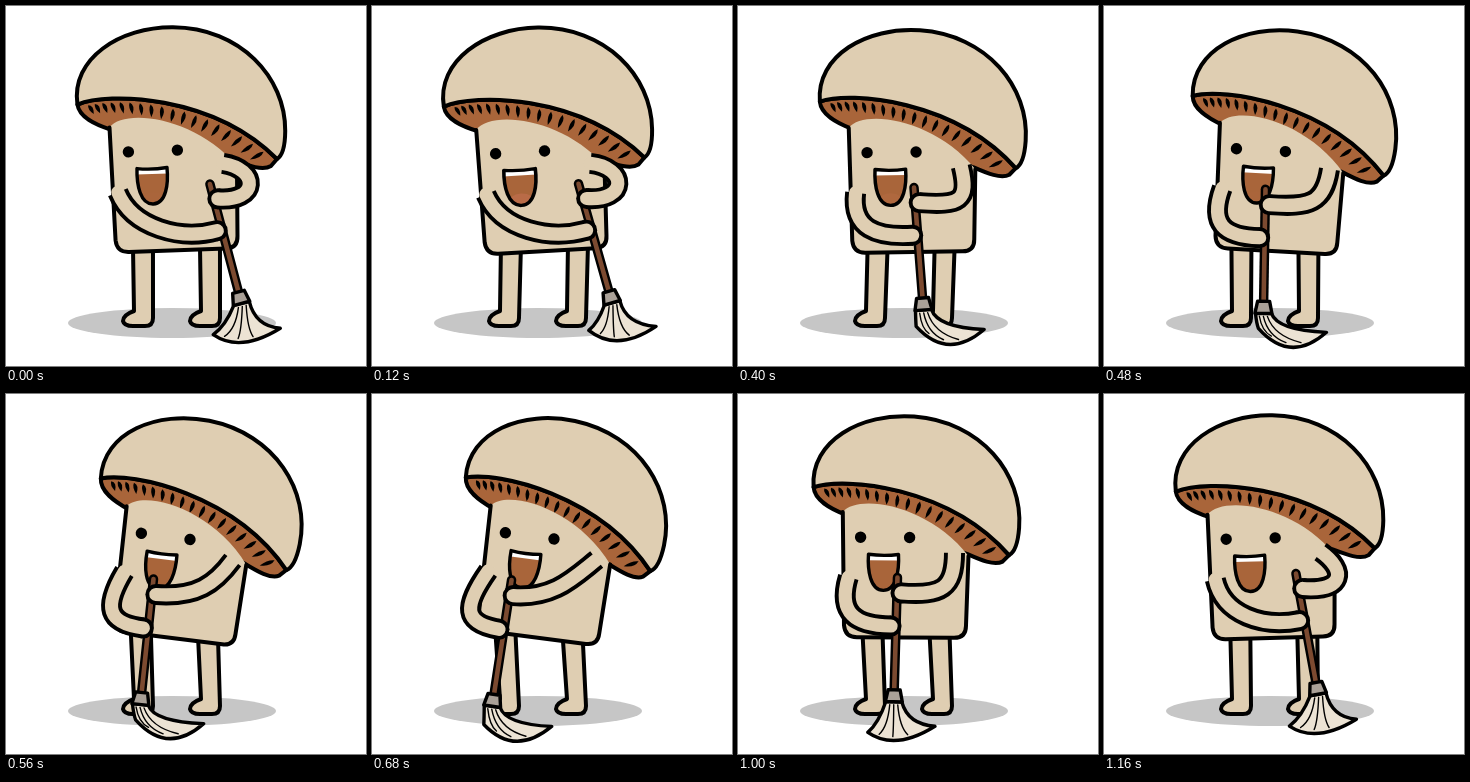
Animation, 360 px wide and 360 px high, one loop 1.2 s. Source, as an HTML page:

```html
<!DOCTYPE html>
<html lang="en">
<head>
<meta charset="utf-8">
<title>Mopping mushroom</title>
<style>
  html, body { margin: 0; width: 100%; height: 100%; overflow: hidden; background: #fff; }
  svg { display: block; width: 100%; height: 100%; }
  .ink { fill: none; stroke: #000; stroke-width: 4; stroke-linecap: round; stroke-linejoin: round; }
  .thin { stroke-width: 3.4; }
  .skin { fill: #dfceb2; }
  .brown { fill: #a9653a; }
</style>
</head>
<body>
<svg viewBox="0 0 360 360">
  <ellipse cx="166" cy="317" rx="104" ry="15" fill="#c6c6c6"/>
  <path id="legL" class="ink skin"/>
  <path id="legR" class="ink skin"/>
  <g id="cap">
    <path class="ink brown" d="M70 97C72 110 88 117 104 122L228 152C242 157 256 162 264 157L270 150C205 86 100 84 70 97Z"/>
    <g id="gills"></g>
    <path class="ink skin" d="M70 97C63 51 112 19 165 19C232 19 278 68 278 122C278 138 275 147 270 150C205 86 100 84 70 97Z"/>
  </g>
  <g id="body">
    <path class="skin" d="M-63 -125L-61 -12Q-60 0 -48 0H49Q61 0 61 -12L63 -82C23 -133 -48 -144 -63 -125Z"/>
    <path class="ink" d="M-63 -125L-61 -12Q-60 0 -48 0H49Q61 0 61 -12L63 -82"/>
    <circle cx="-45" cy="-100" r="5.7"/>
    <circle cx="4" cy="-100" r="5.7"/>
    <clipPath id="lips"><path d="M-15 0Q0 2 15 0C16 16 13 36 0 36C-13 36 -16 16 -15 0Z"/></clipPath>
    <g id="mouth">
      <g clip-path="url(#lips)">
        <rect class="brown" x="-20" y="-2" width="40" height="40"/>
        <ellipse id="tongue" cy="34" rx="13" ry="10" fill="#dc7866"/>
        <rect x="-20" y="-2" width="40" height="8" fill="#fff"/>
      </g>
      <path class="ink thin" d="M-15 0Q0 2 15 0C16 16 13 36 0 36C-13 36 -16 16 -15 0Z"/>
    </g>
  </g>
  <path id="stickInk" class="ink" style="stroke-width:9.5"/>
  <path id="stick" class="ink" style="stroke:#7c4a30;stroke-width:4.6"/>
  <path id="mop" class="ink thin" style="fill:#ece3d4"/>
  <path id="strands" class="ink" style="stroke-width:1.4"/>
  <path id="ferrule" class="ink thin" style="fill:#aaa198"/>
  <g id="armL"></g>
  <g id="armR"></g>
</svg>
<script>
const LOOP = 1200, STEP = 40, TAU = Math.PI * 2;

// Where the mop meets the floor: [time, x], joined smoothly around the loop.
const sweep = [[0, 234], [240, 209], [400, 185], [560, 135], [840, 128], [1000, 156], [1160, 213]];

const $ = id => document.getElementById(id);
const set = (id, d) => $(id).setAttribute("d", d);
const place = (id, value) => $(id).setAttribute("transform", value);
const mix = (a, b, k) => a + (b - a) * k;
const shift = ([x, y], dx, dy) => [x + dx, y + dy];
const between = (a, b, k) => [mix(a[0], b[0], k), mix(a[1], b[1], k)];
const wave = (t, peak) => Math.cos(TAU * (t - peak) / LOOP);
const pulse = (t, peak, power) => (.5 + .5 * wave(t, peak)) ** power;

function make(parent, tag, attrs) {
  const el = document.createElementNS("http://www.w3.org/2000/svg", tag);
  for (const key in attrs) el.setAttribute(key, attrs[key]);
  return parent.appendChild(el);
}

// Cyclic cubic through [time, value] points.
function along(points, t) {
  const n = points.length;
  const at = i => {
    const [time, v] = points[(i + n) % n];
    return [time + LOOP * Math.floor(i / n), v];
  };
  const slope = i => {
    const [[ta, a], [tb, b], [tc, c]] = [at(i - 1), at(i), at(i + 1)];
    return ((tc - tb) * (b - a) / (tb - ta) + (tb - ta) * (c - b) / (tc - tb)) / (tc - ta);
  };
  let i = n - 1;
  while (points[i][0] > t) i--;
  const [t0, v0] = at(i), [t1, v1] = at(i + 1);
  const h = t1 - t0, u = (t - t0) / h;
  return mix(v0, v1, u * u * (3 - 2 * u)) + h * u * (1 - u) * ((1 - u) * slope(i) - u * slope(i + 1));
}

function buildGills() {
  const count = 18;
  for (let i = 0; i < count; i++) {
    const t = mix(.08, .95, i / (count - 1)), s = 1 - t;
    const a = s ** 3, b = 3 * s * s * t, c = 3 * s * t * t, d = t ** 3;
    const x = a * 70 + b * 100 + c * 205 + d * 270;
    const y = a * 97 + b * 84 + c * 86 + d * 150;
    const angle = Math.atan2(205 - y, 150 - x) * 360 / TAU;
    const end = 14 + 6 * t;
    make($("gills"), "path", {
      d: `M4 0Q${end / 2} -5 ${end} 0Q${end / 2} 3 4 0Z`,
      transform: `translate(${x} ${y}) rotate(${angle})`
    });
  }
}

function buildArm(id) {
  const arm = $(id);
  make(arm, "path", { fill: "none", stroke: "#000", "stroke-width": 21 });
  make(arm, "circle", { r: 10.5 });
  make(arm, "path", { fill: "none", stroke: "#dfceb2", "stroke-width": 13.2, "stroke-linecap": "round" });
}

function drawArm(id, shoulder, bendA, bendB, hand) {
  const [outer, palm, inner] = $(id).children;
  const d = `M${shoulder}C${bendA} ${bendB} ${hand}`;
  outer.setAttribute("d", d);
  inner.setAttribute("d", d);
  palm.setAttribute("cx", hand[0]);
  palm.setAttribute("cy", hand[1]);
}

function drawLeg(id, top, foot) {
  set(id, `M${top - 10} 240L${foot + 11} 305Q${foot} 309 ${foot} 315Q${foot + 1} 320 ${foot + 10} 320` +
    `H${foot + 22}Q${foot + 30} 320 ${foot + 30} 312L${top + 10} 240`);
}

// The head trails behind the ferrule; drag runs from 0 to 1.
function drawMop(top, foot, drag) {
  const len = Math.hypot(foot[0] - top[0], foot[1] - top[1]);
  const ux = (foot[0] - top[0]) / len, uy = (foot[1] - top[1]) / len;
  const near = (down, side) => shift(foot, ux * down + uy * side, uy * down - ux * side);
  const stick = `M${top}L${foot}`;
  set("stickInk", stick);
  set("stick", stick);
  set("ferrule", `M${near(-6, -6)}L${near(-6, 6)}L${near(6, 8.5)}L${near(6, -8.5)}Z`);

  const left = near(6, -8), right = near(6, 8);
  const heel = shift(foot, -28 + 23 * drag, 38 - 17 * drag);
  const tip = shift(foot, 39 + 24 * drag, 31 - 6 * drag);
  const low = shift(foot, 2 + 26 * drag, 45 - 5 * drag);
  const pull = between(between(heel, tip, .5), low, 2);
  set("mop", `M${left}Q${mix(left[0], heel[0], .4)} ${mix(left[1], heel[1], .7)} ${heel}` +
    `Q${pull} ${tip}Q${right[0] + 6} ${tip[1] - 2} ${right}Z`);

  let strands = "";
  for (let i = 0; i < 3; i++) {
    const k = .2 + .22 * i, start = near(9, i * 4 - 4);
    const end = shift(between(between(heel, pull, k), between(pull, tip, k), k), 0, -4);
    strands += `M${start}Q${mix(start[0], end[0], .2)} ${mix(start[1], end[1], .75)} ${end}`;
  }
  set("strands", strands);
}

function draw(t) {
  const sway = wave(t, 110), lag = wave(t, 410);
  const kick = pulse(t, 600, 5), sing = pulse(t, 240, 12);

  const capTilt = 3.4 - 4 * sway - .7 * lag + 6 * kick;
  place("cap", `translate(${175 - 3.5 * sway + 2.5 * lag + 8 * kick} ${129.5 - 2 * sway + lag}) ` +
    `rotate(${capTilt}) translate(-169.5 -125)`);

  const hip = [172 + 2 * sway + 5 * lag - 7 * kick, 245 + 1.5 * lag - 2 * kick];
  const tilt = -1.2 - 2 * sway - 1.5 * lag + 8.5 * kick;
  const cos = Math.cos(tilt * TAU / 360), sin = Math.sin(tilt * TAU / 360);
  const onBody = (x, y) => shift(hip, x * cos - y * sin, x * sin + y * cos);
  place("body", `translate(${hip}) rotate(${tilt})`);
  place("mouth", `translate(-22 -83) scale(${1 + .17 * sing} 1)`);
  $("tongue").setAttribute("opacity", sing);

  const step = .6 * (hip[0] - 171);
  drawLeg("legL", 137 + step, 117);
  drawLeg("legR", 204 + step, 184);

  const x = along(sweep, t), off = x - 185;
  const top = [176 + .57 * off, 181.5 - .07 * off], foot = [x, 298 - .13 * off];
  drawMop(top, foot, pulse(t, 510, 1));

  const handL = shift(between(top, foot, .41), -5, 0), shoulderL = onBody(-57, -60);
  const spanL = handL[0] - shoulderL[0];
  drawArm("armL", shoulderL, shift(shoulderL, .45 * spanL - 30, 36),
    shift(handL, -36, .18 * spanL - 8), handL);

  const handR = shift(between(top, foot, .13), 4, 0), shoulderR = onBody(49, -85);
  const spanR = shoulderR[0] - handR[0];
  drawArm("armR", shoulderR, shift(shoulderR, 40 - .75 * spanR, 36 * Math.sin(spanR * TAU / 200)),
    shift(handR, 41, 3), handR);
}

function tick() {
  draw(Math.floor(performance.now() / STEP) * STEP % LOOP);
  requestAnimationFrame(tick);
}

buildGills();
buildArm("armL");
buildArm("armR");
tick();
</script>
</body>
</html>
```
